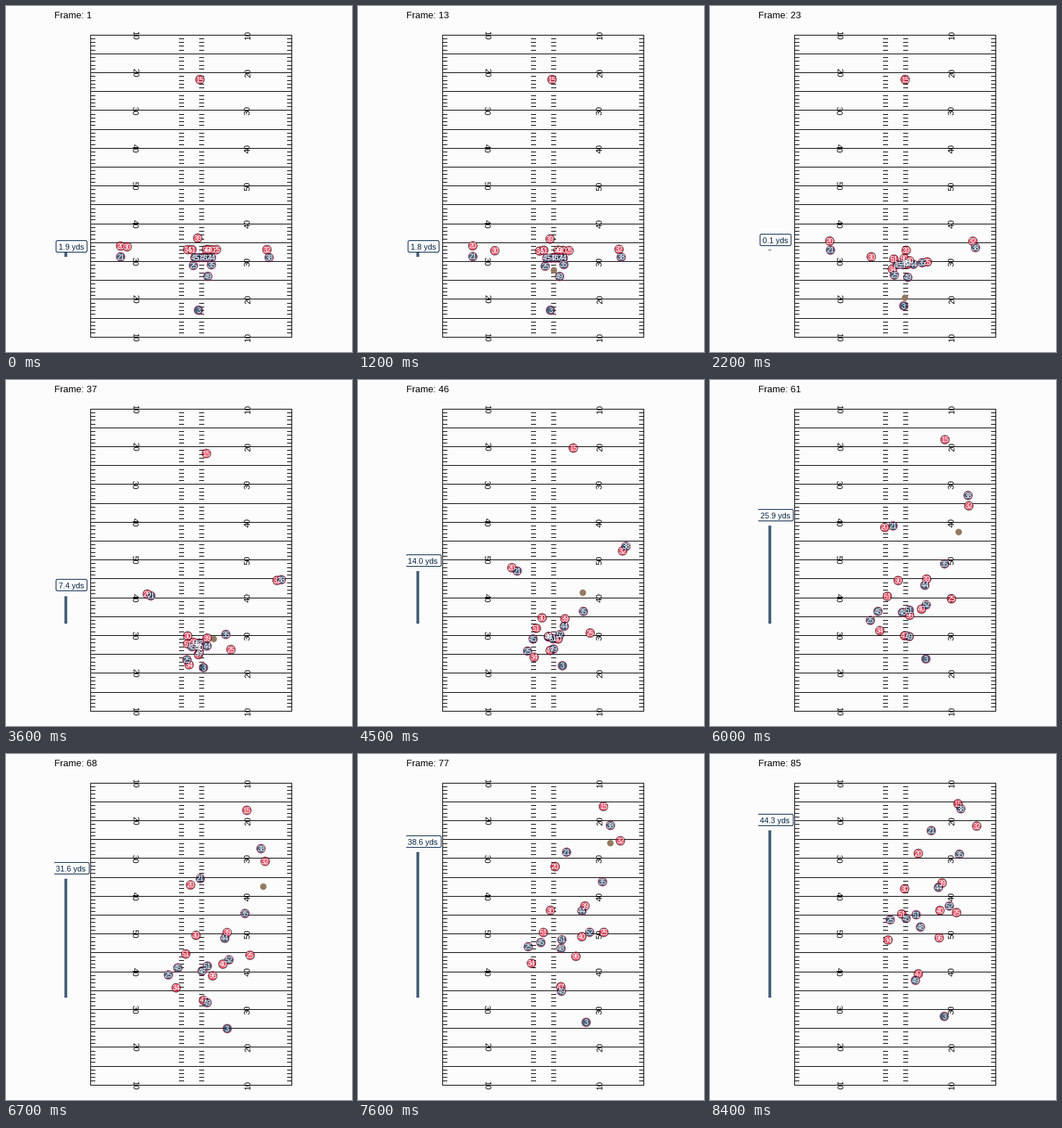
Animation of 480x480 px, one loop 8.5 s. Source, as a matplotlib script:

```python
import numpy as np
import matplotlib.pyplot as plt
from matplotlib.animation import FuncAnimation
from matplotlib.patches import Circle, FancyBboxPatch, Rectangle

SIZE, DPI, FRAMES = 480, 100, 85
PX = 72 / DPI
PAPER, RED, NAVY, TRIM, BALL = "#FCFCFC", "#E31837", "#002244", "#C60C30", "#937A60"
LEFT, RIGHT, TOP, YARD = 117, 396, 39.7, 419 / 80
SCRIMMAGE = 338.3
LINE = {RED: 338, NAVY: 349}
SNAP, KICK = 10, 37
# how quickly a player gets going downfield once the ball is kicked
BLOCK, COVER, FLY, GUN = 0.2, 0.7, 0.9, 1.25

plt.rcParams["font.family"] = "Liberation Sans"
fig = plt.figure(figsize=(SIZE / DPI, SIZE / DPI), dpi=DPI, facecolor=PAPER)
ax = fig.add_axes([0, 0, 1, 1])
ax.set_xlim(0, SIZE)
ax.set_ylim(SIZE, 0)
ax.axis("off")
clock = np.arange(1, FRAMES + 1)


def rule(xs, ys):
    ax.plot(xs, ys, color="black", lw=PX, antialiased=False,
            solid_capstyle="butt", zorder=1)


def draw_field():
    for x in (LEFT, RIGHT):
        rule([x, x], [TOP, TOP + 80 * YARD])
    for n in range(81):
        y = TOP + n * YARD
        if n % 5 == 0:
            rule([LEFT, RIGHT], [y, y])
        else:
            for x in (LEFT, 240, 268, RIGHT - 6):
                rule([x, x + 6], [y, y])
    for n in range(9):
        label = str(10 * (5 - abs(n - 4)))
        for x, angle in ((178, 270), (336, 90)):
            ax.text(x, TOP + 0.5 + 10 * n * YARD, label, rotation=angle,
                    ha="center", va="center", fontsize=11.4 * PX, zorder=2)


def phase(start, end):
    return np.clip((clock - start) / (end - start), 0, 1)


def run_ease(u, pace):
    """Cubic from 0 to 1; a slow start is made up for by a fast finish."""
    finish = 1.6 - 0.8 * pace
    return u * u * (3 - 2 * u) + u * (1 - u) ** 2 * pace - u * u * (1 - u) * finish


def route(start, kick, end, pace, bend, go):
    """Push to the kick position, then run to the end with a sideways bend."""
    push, run = phase(go, KICK), phase(KICK, FRAMES)
    push = push ** 2.25 if pace >= FLY else push * push * (3 - 2 * push)
    (x0, y0), (x1, y1), (x2, y2) = start, kick, end
    x = x0 + (x1 - x0) * push + (x2 - x1) * run + bend * np.sin(np.pi * run)
    y = y0 + (y1 - y0) * push + (y2 - y1) * run_ease(run, pace)
    return np.column_stack([x, y])


players = []


def add(team, number, x, kick, end, pace=BLOCK, back=0, bend=0, go=SNAP):
    path = route((x, LINE[team] + back), kick, end, pace, bend, go)
    dot = Circle((0, 0), 6.1, facecolor=team, lw=0.8 * PX, alpha=0.7, zorder=4,
                 edgecolor="black" if team == RED else TRIM)
    ax.add_patch(dot)
    tag = ax.text(0, 0, str(number), color="white", fontsize=10 * PX,
                  ha="center", va="baseline", zorder=5)
    players.append((dot, tag, path))
    return path


draw_field()

add(RED, 15, 269, (278, 102), (344, 69), GUN, back=-236, bend=15)
add(RED, 20, 159, (196, 297), (289, 138), GUN, back=-5)
add(RED, 30, 168, (252, 355), (270, 187), COVER, back=-4, go=1)
add(RED, 32, 362, (376, 278), (370, 100), GUN, bend=-14)
add(RED, 39, 266, (279, 358), (322, 179), COVER, back=-16)
add(RED, 25, 292, (312, 374), (342, 220), COVER, bend=8)
add(RED, 34, 252, (254, 395), (247, 258), bend=-15)
add(RED, 51, 258, (252, 366), (266, 222), COVER, bend=-13)
add(RED, 96, 278, (260, 364), (318, 255), bend=-12)
add(RED, 40, 285, (268, 371), (319, 217))
add(RED, 47, 280, (267, 381), (289, 305), bend=-8)

runner = add(NAVY, 21, 159, (201, 299.5), (307, 106.3), FLY, back=-1)
add(NAVY, 38, 365, (382, 277), (348, 76), GUN, bend=-7)
add(NAVY, 3, 267, (274, 399), (325, 364), back=73, go=16)
add(NAVY, 49, 280, (268, 378), (285, 314), back=26)
add(NAVY, 25, 260, (251, 388), (250, 230), back=11, bend=-28)
add(NAVY, 35, 285, (305, 353), (346, 139), COVER, back=10)
add(NAVY, 44, 285, (279, 369), (317, 185), COVER)
add(NAVY, 45, 262, (258, 370), (272, 228), bend=-32)
add(NAVY, 48, 274, (266, 366), (292, 240), bend=-12)
add(NAVY, 52, 279, (268, 365), (332, 211))
add(NAVY, 51, 268, (267, 370), (286, 223))

# snap, hold, punt, bounce, roll
moments = [SNAP, 20, 32, 54, 68, FRAMES]
ball_x = np.interp(clock, moments, [273, 269, 275, 333, 357, 344])
ball_y = np.interp(clock, moments, [349, 408, 395, 238, 184, 70])
ball = Circle((0, 0), 4.5, facecolor=BALL, edgecolor="none", zorder=3)
ax.add_patch(ball)

title = ax.text(67, 17, "", fontsize=13 * PX, va="baseline")
bar = Rectangle((81, 0), 4, 1, facecolor=NAVY, edgecolor="none", alpha=0.7,
                antialiased=False, zorder=6)
ax.add_patch(bar)
box = FancyBboxPatch((69, 0), 43, 16, boxstyle="round,pad=0,rounding_size=2",
                     facecolor=PAPER, edgecolor=NAVY, lw=PX, zorder=7)
ax.add_patch(box)
box.set_clip_path(Rectangle((67, 0), SIZE, SIZE, transform=ax.transData))
caption = ax.text(90, 0, "", color=NAVY, fontsize=11 * PX, ha="center",
                  va="baseline", zorder=8)


def update(i):
    title.set_text(f"Frame: {i + 1}")
    for dot, tag, path in players:
        x, y = path[i]
        dot.center = (x, y)
        tag.set_position((x, y + 3.6))
    ball.center = (ball_x[i], ball_y[i])

    y = runner[i, 1]
    gap = abs(SCRIMMAGE - y)
    bar.set_y(min(y, SCRIMMAGE))
    bar.set_height(max(gap, 1))
    text = f"{gap / YARD:.1f} yds"
    width = 43 + 6.1 * (len(text) - 7)
    mid = round(y - 15) + 0.5
    box.set_bounds(90.9 - width / 2, mid - 8, width, 16)
    caption.set_text(text)
    caption.set_position((90.2, mid + 4.5))
    return []


anim = FuncAnimation(fig, update, frames=FRAMES, interval=100, repeat=True,
                     repeat_delay=0, init_func=lambda: update(0), blit=False)
plt.show()
```
